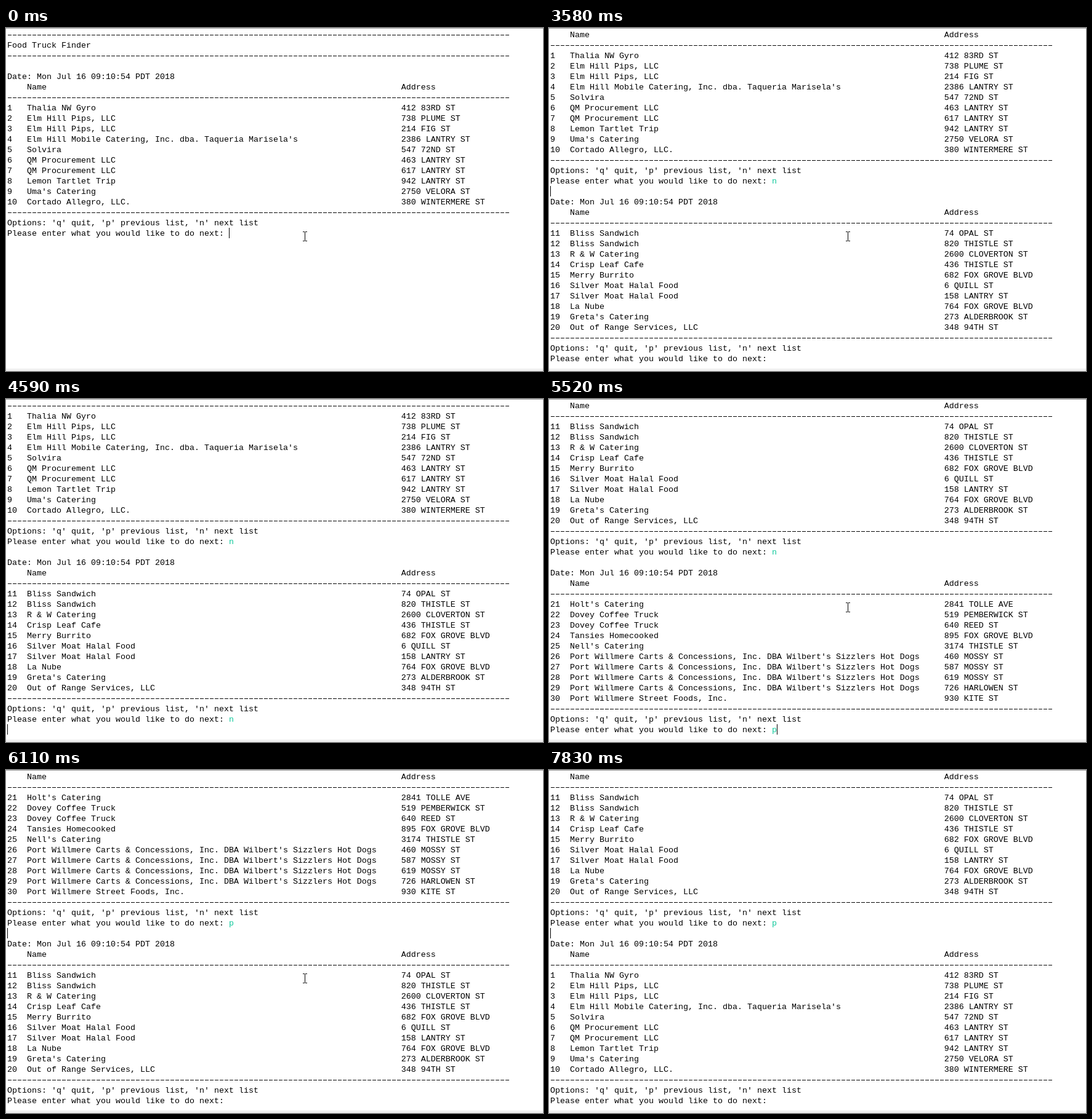
An HTML page that plays this animation: 872x558 px, repeating every 8000 ms.

```html
<!DOCTYPE html>
<html lang="en">
<head>
<meta charset="utf-8">
<title>Food Truck Finder</title>
<style>
html, body { margin: 0; width: 100%; height: 100%; overflow: hidden; background: #fff; }
#stage { position: relative; width: 872px; height: 558px; overflow: hidden; }
#stage::before, #stage::after { content: ""; position: absolute; left: 0; width: 100%; }
#stage::before { top: 0; height: 1px; background: #a0a0a0; }
#stage::after { bottom: 0; height: 4px; background: #f0f0f0; }
#view { position: absolute; inset: 2px 0 4px; overflow: hidden; }
#doc { position: absolute; left: 2px; top: 0; color: #000;
  font: 13.33px "Liberation Mono", "Courier New", monospace; }
.line { height: 17px; line-height: 19px; white-space: pre; }
.rule { width: 816px; height: 17px;
  background: repeating-linear-gradient(90deg, transparent 0 1px, #000 1px 7px, transparent 7px 8px)
    0 9px / 816px 1px no-repeat; }
.key { color: #10c89b; }
#caret { position: absolute; left: 0; top: 0; width: 1px; height: 17px; background: #000; }
#mouse { position: absolute; left: 482px; top: 331px; }

#doc, #caret, #mouse, .page, .key { animation: 8s step-end infinite; }
#doc { animation-name: scroll; }
#caret { animation-name: caret; }
#mouse { animation-name: mouse; }
.page:nth-of-type(2) { animation-name: page2; }
.page:nth-of-type(3) { animation-name: page3; }
.page:nth-of-type(4) { animation-name: page4; }
.page:nth-of-type(5) { animation-name: page5; }
.page:nth-of-type(1) .key { animation-name: key1; }
.page:nth-of-type(2) .key { animation-name: key2; }
.page:nth-of-type(3) .key { animation-name: key3; }
.page:nth-of-type(4) .key { animation-name: key4; }

@keyframes page2 { 0% { opacity: 0 } 31.625% { opacity: 1 } }
@keyframes page3 { 0% { opacity: 0 } 60.5% { opacity: 1 } }
@keyframes page4 { 0% { opacity: 0 } 76.375% { opacity: 1 } }
@keyframes page5 { 0% { opacity: 0 } 97.875% { opacity: 1 } }
@keyframes key1 { 0% { opacity: 0 } 20.125% { opacity: 1 } }
@keyframes key2 { 0% { opacity: 0 } 50.125% { opacity: 1 } }
@keyframes key3 { 0% { opacity: 0 } 69% { opacity: 1 } }
@keyframes key4 { 0% { opacity: 0 } 89.5% { opacity: 1 } }

@keyframes scroll {
  0% { transform: translateY(0) }
  31.625% { transform: translateY(-85px) }
  55.875% { transform: translateY(-95px) }
  57.375% { transform: translateY(-102px) }
  60.5% { transform: translateY(-374px) }
  72.875% { transform: translateY(-384px) }
  74.75% { transform: translateY(-391px) }
  76.375% { transform: translateY(-663px) }
  92.875% { transform: translateY(-673px) }
  94.5% { transform: translateY(-680px) }
  97.875% { transform: translateY(-952px) }
}
@keyframes caret {
  0%, 12% { transform: translate(360px, 323px); opacity: 1 }
  5%, 18.25% { transform: translate(360px, 323px); opacity: 0 }
  20.125% { transform: translate(368px, 323px); opacity: 1 }
  25.125%, 44.75% { transform: translate(0, 340px); opacity: 1 }
  38.125% { transform: translate(0, 340px); opacity: 0 }
  50.125% { transform: translate(368px, 612px); opacity: 1 }
  55.875% { transform: translate(0, 629px); opacity: 1 }
  67.5% { transform: translate(0, 629px); opacity: 0 }
  69% { transform: translate(368px, 901px); opacity: 1 }
  72.875% { transform: translate(0, 918px); opacity: 1 }
  82.875% { transform: translate(0, 918px); opacity: 0 }
  89.5% { transform: translate(368px, 1190px); opacity: 1 }
  92.875% { transform: translate(0, 1207px); opacity: 1 }
}
@keyframes mouse {
  0%, 26.625%, 52%, 64.375%, 76.375% { opacity: 1 }
  20.125%, 48.25%, 55.875%, 72.875%, 89.5% { opacity: 0 }
}
</style>
</head>
<body>
<div id="stage">
  <div id="view"><div id="doc"></div></div>
  <svg id="mouse" width="7" height="16" shape-rendering="crispEdges">
    <path d="M0 0h3v1h1v14h-1v1h-3v-1h3v-14h-3zM4 0h3v1h-3zM4 15h3v1h-3z"/>
  </svg>
</div>
<script>
const lists = [
`Thalia NW Gyro|412 83RD ST
Elm Hill Pips, LLC|738 PLUME ST
Elm Hill Pips, LLC|214 FIG ST
Elm Hill Mobile Catering, Inc. dba. Taqueria Marisela's|2386 LANTRY ST
Solvira|547 72ND ST
QM Procurement LLC|463 LANTRY ST
QM Procurement LLC|617 LANTRY ST
Lemon Tartlet Trip|942 LANTRY ST
Uma's Catering|2750 VELORA ST
Cortado Allegro, LLC.|380 WINTERMERE ST`,
`Bliss Sandwich|74 OPAL ST
Bliss Sandwich|820 THISTLE ST
R & W Catering|2600 CLOVERTON ST
Crisp Leaf Cafe|436 THISTLE ST
Merry Burrito|682 FOX GROVE BLVD
Silver Moat Halal Food|6 QUILL ST
Silver Moat Halal Food|158 LANTRY ST
La Nube|764 FOX GROVE BLVD
Greta's Catering|273 ALDERBROOK ST
Out of Range Services, LLC|348 94TH ST`,
`Holt's Catering|2841 TOLLE AVE
Dovey Coffee Truck|519 PEMBERWICK ST
Dovey Coffee Truck|640 REED ST
Tansies Homecooked|895 FOX GROVE BLVD
Nell's Catering|3174 THISTLE ST
Port Willmere Carts & Concessions, Inc. DBA Wilbert's Sizzlers Hot Dogs|460 MOSSY ST
Port Willmere Carts & Concessions, Inc. DBA Wilbert's Sizzlers Hot Dogs|587 MOSSY ST
Port Willmere Carts & Concessions, Inc. DBA Wilbert's Sizzlers Hot Dogs|619 MOSSY ST
Port Willmere Carts & Concessions, Inc. DBA Wilbert's Sizzlers Hot Dogs|726 HARLOWEN ST
Port Willmere Street Foods, Inc.|930 KITE ST`
];

const rule = '<div class="rule"></div>';
const line = html => `<div class="line">${html}</div>`;
const row = (num, name, address) =>
  line((String(num).padEnd(4) + name.padEnd(76) + address).replace(/&/g, '&amp;'));

function page(index, key) {
  const rows = lists[index].split('\n')
    .map((entry, i) => row(index * 10 + i + 1, ...entry.split('|')));
  return '<section class="page">' +
    line('Date: Mon Jul 16 09:10:54 PDT 2018') + row('', 'Name', 'Address') +
    rule + rows.join('') + rule +
    line("Options: 'q' quit, 'p' previous list, 'n' next list") +
    line(`Please enter what you would like to do next: <span class="key">${key}</span>`) +
    line('') + '</section>';
}

// Pages in the order they are visited, each with the key that leaves it.
const visits = [[0, 'n'], [1, 'n'], [2, 'p'], [1, 'p'], [0, '']];
document.getElementById('doc').innerHTML =
  rule + line('Food Truck Finder') + rule + line('') +
  visits.map(visit => page(...visit)).join('') + '<div id="caret"></div>';
</script>
</body>
</html>
```
